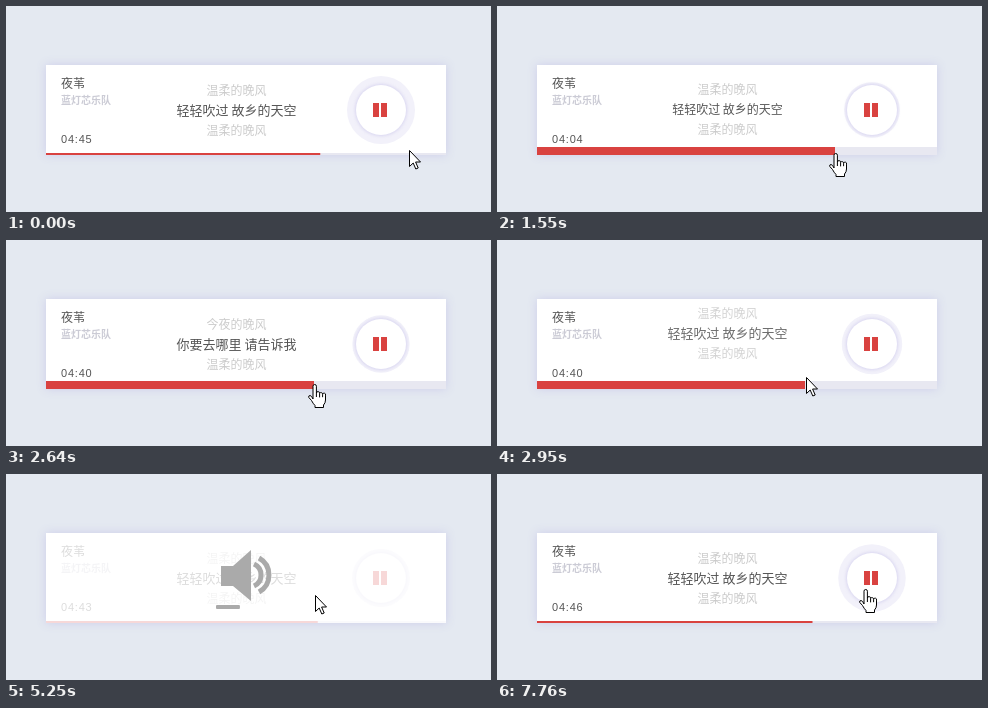
An HTML page for the animation above (8000 ms loop, 485 px wide and 206 px high).

```html
<!DOCTYPE html>
<html lang="zh">
<head>
<meta charset="utf-8">
<title>Music player</title>
<style>
html, body { margin: 0; width: 100%; height: 100%; overflow: hidden; background: #e4e9f1; }
svg { display: block; width: 485px; height: 206px; }
text { font-family: "Noto Sans CJK SC", "Noto Sans CJK", "Noto Sans", sans-serif; }
.card { fill: #fff; filter: drop-shadow(0 0 5px #cdcdea); }
.title { font-size: 12px; font-weight: 500; fill: #555; }
.band { font-size: 10px; font-weight: 700; fill: #cbcbd5; }
.time { font: 11px "Liberation Sans", Arial, sans-serif; letter-spacing: .8px; fill: #555; }
.lyric { text-anchor: middle; fill: #555; }
.red { fill: #d94240; }
.glow { fill: #d9d6f0; filter: blur(1.5px); }
.speaker { fill: #aaa; }
.wave { fill: none; stroke: #aaa; stroke-width: 5; }
.cursor path { fill: #fff; stroke: #000; stroke-linejoin: round; }
</style>
</head>
<body>
<svg viewBox="0 0 485 206">
  <clipPath id="clip"><rect x="40" y="59" width="400" height="90"/></clipPath>
  <rect class="card" x="40" y="59" width="400" height="90"/>
  <g id="content" clip-path="url(#clip)">
    <text class="title" x="55" y="82">夜苇</text>
    <text class="band" x="55" y="98">蓝灯芯乐队</text>
    <text class="time" id="time" x="55" y="137"></text>
    <g id="lyrics"></g>
    <circle id="ring" cx="375" cy="104" fill="#f2f1fa"/>
    <circle class="glow" cx="375" cy="104" r="26"/>
    <circle cx="375" cy="104" r="25" fill="#fff"/>
    <path class="red" d="M367 97h6v14h-6zM375 97h6v14h-6z"/>
    <rect id="track" x="40" width="400" fill="#e8e8f1"/>
    <rect id="bar" class="red" x="40"/>
  </g>
  <g id="volume">
    <path class="speaker" d="M215 92h12l18-16v51l-18-15h-12z"/>
    <path class="wave" d="M248 90A12.1 12.1 0 0 1 248 112M253 84A19.5 19.5 0 0 1 253 118"/>
    <rect id="level" class="speaker" x="210" y="131" height="4" rx="1"/>
  </g>
  <g id="cursor" class="cursor">
    <path id="arrow" d="M.5 .5V16.5L4.2 13 6.8 19 9.2 18 6.6 12H11.5z"/>
    <path id="hand" transform="translate(-6)" d="M5 15V2.2a1.7 1.7 0 0 1 3.4 0V9a1.6 1.6 0 0 1 3.2 .4a1.6 1.6 0 0 1 3 .8a1.5 1.5 0 0 1 2.9 .9V16q0 3-2 5v2.5H7v-2q-2-2-3.5-5L.8 13.5q-.6-2 1.2-2q1.5 0 3 3.5M8.4 9v4M11.6 9.4v4M14.6 10.2v3"/>
  </g>
</svg>
<script>
const LOOP = 8000;
const $ = id => document.getElementById(id);
const set = (el, attrs) => { for (const k in attrs) el.setAttribute(k, attrs[k]); };
const clamp = p => Math.min(1, Math.max(0, p));
const mix = (a, b, p) => a + (b - a) * p;

// CSS "ease" timing curve
function ease(p) {
  let lo = 0, hi = 1, u;
  for (let i = 0; i < 20; i++) {
    u = (lo + hi) / 2;
    if (.75 * u * (1 - u) + u ** 3 < p) lo = u; else hi = u;
  }
  return .3 * u * (1 - u) ** 2 + 3 * u * u * (1 - u) + u ** 3;
}
const tween = (t, start, length) => p01(ease(clamp((t - start) / length)));
const p01 = p => p < .001 ? 0 : p > .999 ? 1 : p;

// Linear path through [time, value] keys
function along(t, keys, column = 1) {
  const i = keys.findIndex(k => k[0] > t);
  if (i < 0) return keys[keys.length - 1][column];
  if (i === 0) return keys[0][column];
  const a = keys[i - 1], b = keys[i];
  return mix(a[column], b[column], (t - a[0]) / (b[0] - a[0]));
}

const seconds = [[0, 285], [300, 286], [1100, 287], [1540, 304], [2200, 305], [2640, 280],
  [3400, 281], [4020, 282], [4960, 283], [6140, 284], [6850, 285], [7660, 286]];
const pointer = [[0, 403, 144], [400, 375, 157], [820, 337, 147], [1150, 338, 147],
  [1850, 338, 147], [2250, 308, 144], [2850, 308, 144], [2950, 309, 137], [3470, 309, 121],
  [6870, 309, 121], [7300, 350, 122], [7630, 367, 118], [7760, 368, 115]];
const levels = [[4150, 31], [4700, 20], [5150, 20], [5330, 27], [5610, 27], [5960, 39]];

const lines = ["温柔的晚风", "轻轻吹过 故乡的天空", "温柔的晚风", "轻轻吹过 城市的灯火",
  "今夜的晚风", "你要去哪里 请告诉我", "温柔的晚风"].map(words => {
  const el = document.createElementNS("http://www.w3.org/2000/svg", "text");
  el.textContent = words;
  set(el, { class: "lyric", x: 230.5 });
  $("lyrics").append(el);
  return el;
});

function drawLyrics(t) {
  const back = t >= 2640;
  const [from, to] = back ? [5, 1] : [1, 5];
  const p = tween(t, back ? 2640 : 1540, 550);
  const shade = d => [1, .3][Math.abs(d)] || 0;
  lines.forEach((el, i) => {
    const current = i === (p ? to : from);
    const size = current ? 13 : 12;
    set(el, {
      y: 104.6 + 20 * (i - mix(from, to, p)) + size * .37,
      "font-size": size,
      opacity: mix(shade(i - from), shade(i - to), p)
    });
  });
}

function draw(t) {
  const s = seconds.filter(k => k[0] <= t).pop()[1];
  $("time").textContent = "04:" + String(s % 60).padStart(2, "0");
  drawLyrics(t);

  const height = 2 + 6 * (tween(t, 830, 320) - tween(t, 2960, 320));
  set($("track"), { y: 149 - height, height });
  set($("bar"), { y: 149 - height, height, width: 268 + (s - 280) * 1.25 });
  set($("ring"), { r: 30.5 + 3.5 * Math.cos(t / 4000 * 2 * Math.PI) });

  const shown = tween(t, 3880, 500) - tween(t, 6830, 500);
  set($("content"), { opacity: 1 - .8 * shown });
  set($("volume"), { opacity: shown });
  set($("level"), { width: along(t, levels) });

  const x = along(t, pointer), y = along(t, pointer, 2);
  const hand = t > 800 && t < 2900 || t > 6870 && x > 351;
  set($("cursor"), { transform: `translate(${Math.round(x)} ${Math.round(y)})` });
  set($("hand"), { visibility: hand ? "visible" : "hidden" });
  set($("arrow"), { visibility: hand ? "hidden" : "visible" });
}

const start = performance.now();
function frame() {
  draw((performance.now() - start) % LOOP);
  requestAnimationFrame(frame);
}
frame();
</script>
</body>
</html>
```
